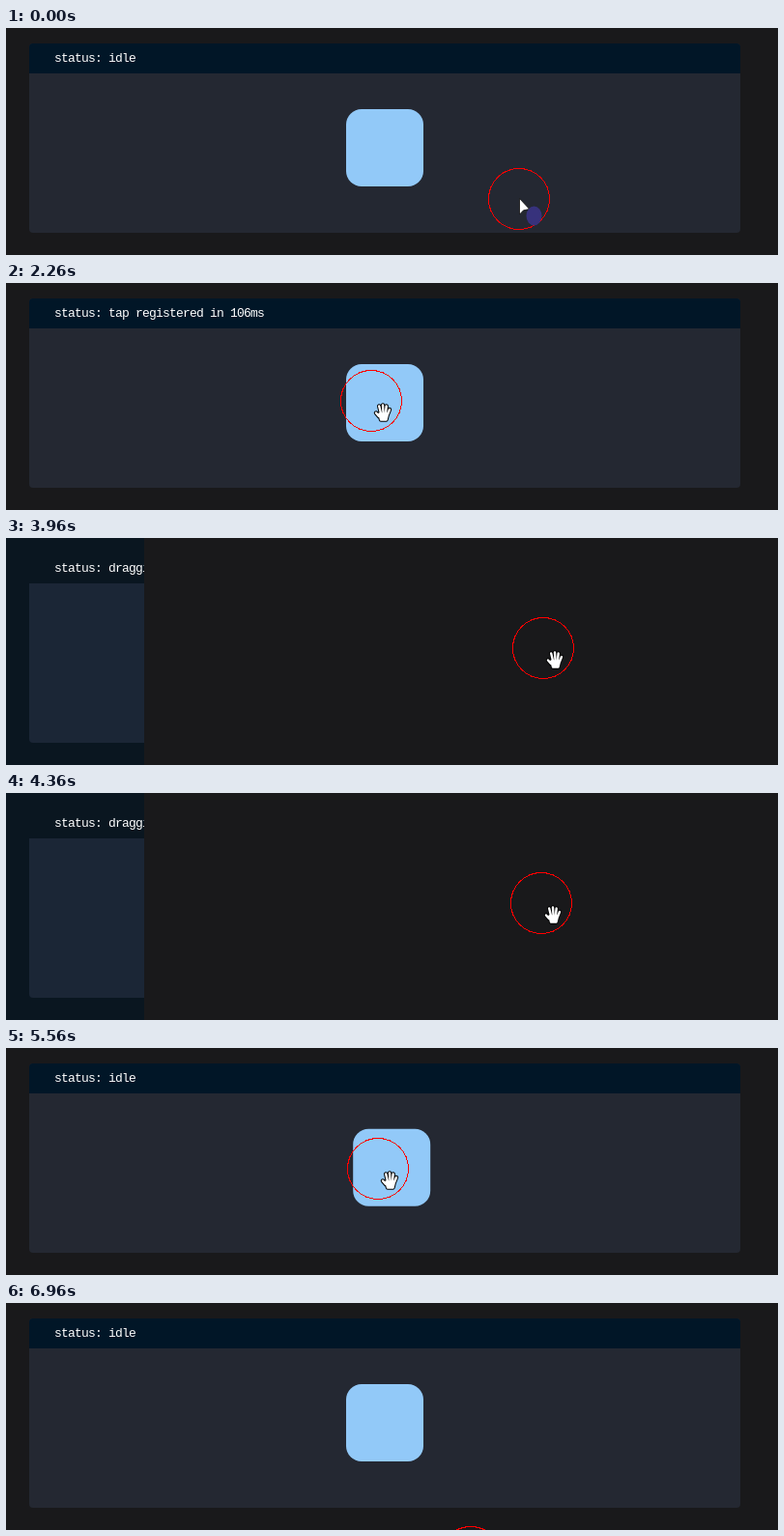
An HTML page for the animation above (7.56 s loop, 799x235 px).

```html
<!DOCTYPE html>
<html lang="en">
<head>
<meta charset="utf-8">
<title>Drag status demo</title>
<style>
  html, body { margin: 0; width: 100%; height: 100%; overflow: hidden; background: #19191b; }
  svg { display: block; width: 799px; height: 235px; overflow: hidden; }
  text { font: 13px "Liberation Mono", monospace; letter-spacing: -.8px; fill: #fff; white-space: pre; }
  .bg { fill: #19191b; }
  .bar { fill: #011627; }
  .panel { fill: #242832; }
  .box { fill: #92c9f8; }
  .ring { fill: none; stroke: #f00; shape-rendering: crispEdges; }
  .edge { fill: #000; stroke: #000; stroke-width: 4.4; }
  .skin { fill: #fff; stroke: #fff; stroke-width: 2.4; }
  .edge, .skin { stroke-linecap: round; stroke-linejoin: round; }
</style>
</head>
<body>
<svg viewBox="0 0 799 235">
  <defs>
    <path id="palm" d="M5 12.5L8 16M8.2 5.5L10 13M12 4.5L12.5 12M15.7 5.5L15 12M19 9L17 14M8.5 13.5H17L15.5 19.5H10Z"/>
  </defs>
  <rect class="bg" width="799" height="235"/>
  <rect class="panel" x="24" y="16" width="736" height="196" rx="4"/>
  <path class="bar" d="M24 47V20a4 4 0 0 1 4-4H756a4 4 0 0 1 4 4V47Z"/>
  <rect class="box" id="box" x="-40" y="-40" width="80" height="80" rx="16"/>
  <g id="tint">
    <rect width="143" height="235" fill="#0a1620"/>
    <path d="M24 47H143V212H28a4 4 0 0 1-4-4Z" fill="#1b2636"/>
  </g>
  <text id="status" x="50" y="35"></text>
  <rect class="bg" id="cover" x="143" width="656" height="235"/>
  <g id="pointer">
    <circle class="ring" r="31.5"/>
    <g id="arrow">
      <path d="M.5-.5V16L4.5 11.8L10.7 10.5Z" fill="#fff" stroke="#111" stroke-width=".8"/>
      <ellipse cx="15.5" cy="17.5" rx="8" ry="10" fill="#37327c"/>
    </g>
    <g id="hand">
      <use href="#palm" class="edge"/>
      <use href="#palm" class="skin"/>
    </g>
  </g>
</svg>
<script>
const LOOP = 7560;
const HOME = [392, 124];
const $ = id => document.getElementById(id);

// Where the pointer turns or rests
const stops = [
  { at: 0, pos: [531, 177] },
  { at: 640, pos: [378, 122] },
  { at: 2360, pos: [378, 122] },
  { at: 3060, pos: [389, 119] },
  { at: 3260, pos: [389, 119] },
  { at: 3960, pos: [556, 114] },
  { at: 4760, pos: [552, 114] },
  { at: 4960, pos: [468, 132] },
  { at: 5560, pos: [385, 125] },
  { at: 5920, pos: [260, 132] },
  { at: 6060, pos: [289, 155] },
  { at: 6360, pos: [375, 204] },
  { at: 6960, pos: [481, 263] }
];

const drags = [{ start: 3260, release: 4720 }, { start: 5560, release: 5920 }];

const add = (a, b) => a.map((v, i) => v + b[i]);
const sub = (a, b) => a.map((v, i) => v - b[i]);
const scale = (a, k) => a.map(v => v * k);

// The picture refreshes every 100 ms
function tick(t) {
  if (t < 240) return t < 100 ? 0 : 100;
  const phase = t < 2260 ? 40 : 60;
  return Math.floor((t - phase) / 100) * 100 + phase;
}

// Halfway between linear and smoothstep
const ease = k => k * (1 + 3 * k - 2 * k * k) / 2;

function pointerAt(t) {
  const next = stops.findIndex(s => s.at > t);
  if (next < 0) return stops.at(-1).pos;
  const [a, b] = [stops[next - 1], stops[next]];
  return add(a.pos, scale(sub(b.pos, a.pos), ease((t - a.at) / (b.at - a.at))));
}

function spring(ms) {
  const s = ms / 1000;
  return s > 1 ? 0 : Math.exp(-3.8 * s) * (Math.cos(7.7 * s) + .5 * Math.sin(7.7 * s));
}

function boxAt(t) {
  const drag = drags.findLast(d => t > d.start);
  if (!drag) return HOME;
  const pulled = sub(pointerAt(Math.min(t, drag.release)), pointerAt(drag.start));
  return add(HOME, scale(pulled, spring(Math.max(0, t - drag.release))));
}

function statusAt(t, dragging) {
  if (dragging) return "dragging";
  if (t < 1240 || t >= 2460) return "idle";
  return `tap registered in ${t < 2260 ? 94 : 106}ms`;
}

const show = (id, on) => $(id).setAttribute("display", on ? "inline" : "none");
const move = (id, [x, y]) => $(id).setAttribute("transform", `translate(${x} ${y})`);

function draw(t) {
  const pointer = pointerAt(t);
  const box = boxAt(t);
  const dragging = drags.some(d => t > d.start && t < d.release);
  const blanked = dragging && drags.some(d => t >= d.start + 200 && t < d.release);
  const hand = sub(pointer, box).every(v => Math.abs(v) < 35);
  move("pointer", pointer.map(Math.round));
  move("box", box);
  $("status").textContent = "status: " + statusAt(t, dragging);
  show("tint", blanked);
  show("cover", blanked);
  show("hand", hand);
  show("arrow", !hand);
}

const begin = performance.now();
function frame() {
  draw(tick((performance.now() - begin) % LOOP));
  requestAnimationFrame(frame);
}
frame();
</script>
</body>
</html>
```
